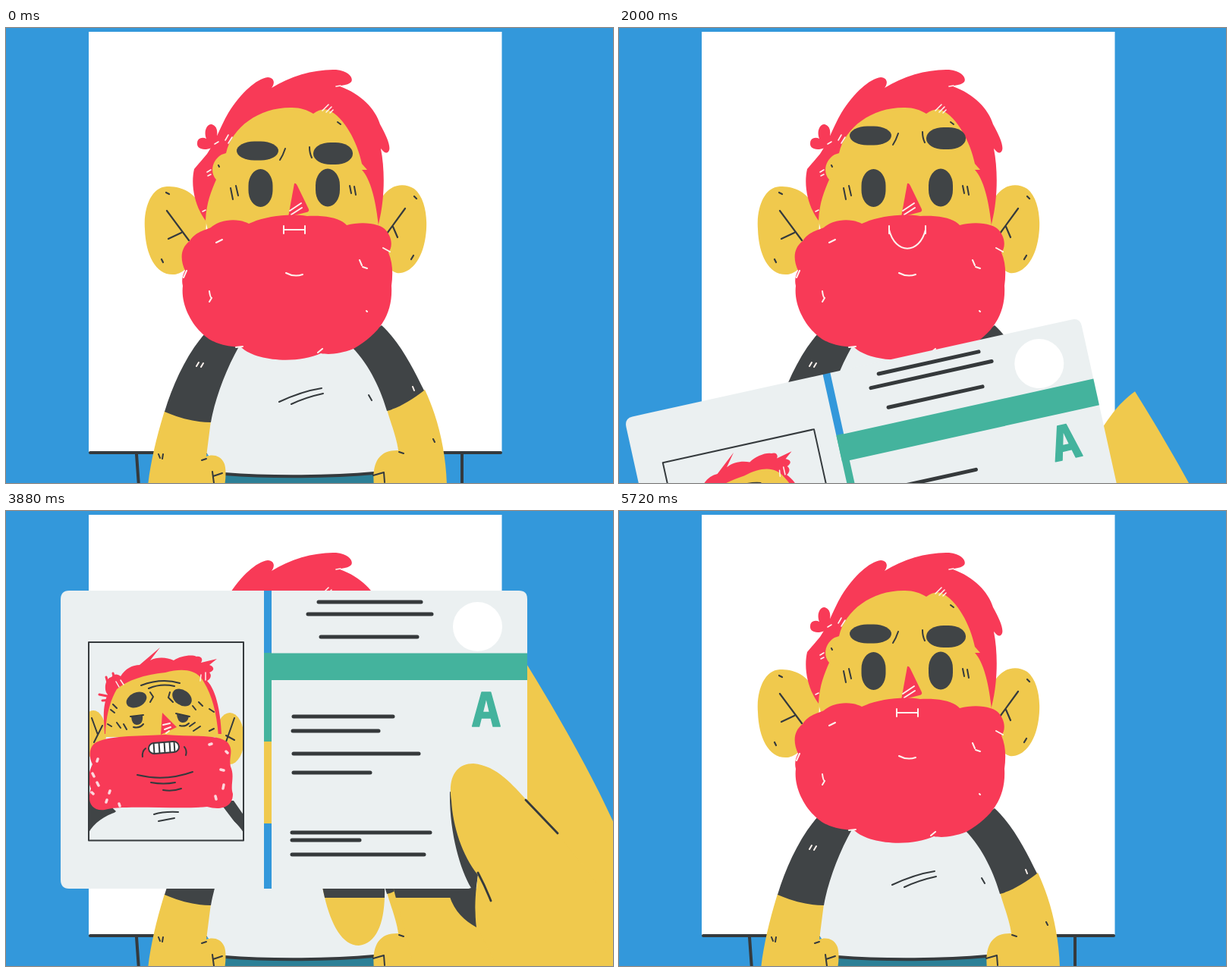
These frames come from a looping animation (800 px wide and 600 px high, 5.76 s). An HTML page:

```html
<!DOCTYPE html>
<html lang="en">
<head>
<meta charset="utf-8">
<title>Passport check</title>
<style>
html, body { margin: 0; width: 100%; height: 100%; overflow: hidden; background: #3398db; }
svg { display: block; width: 100vw; height: 100vh; }
.red { fill: #f83a57; }
.skin { fill: #f0c94d; }
.dark { fill: #404446; }
.pale { fill: #ebf0f1; }
.green { fill: #44b39d; }
.blue { fill: #3398db; }
.white { fill: #fff; }
.ink, .chalk, .rule { fill: none; stroke-linecap: round; stroke-linejoin: round; }
.ink { stroke: #353a3d; stroke-width: 2; }
.chalk { stroke: #fdf3ee; stroke-width: 2; }
.rule { stroke: #35393b; stroke-width: 5; }
text { font: 700 63px "Noto Sans Mono", monospace; text-anchor: middle; stroke: #44b39d; stroke-width: 1.5; stroke-linejoin: round; }
</style>
</head>
<body>
<svg viewBox="0 0 800 600">
  <defs>
    <clipPath id="backHand">
      <path d="M416 470V498C424 545 440 581 465 581C490 578 500 548 499 505V470ZM502 470L513 515L526 562H612V470Z"/>
    </clipPath>
    <clipPath id="photoBox"><rect x="109" y="181" width="204" height="262"/></clipPath>
  </defs>

  <rect class="blue" width="800" height="600"/>
  <path class="ink" style="stroke-width:4" d="M172 562L175 604M601 562V604"/>
  <rect class="white" x="109" y="5" width="544.500" height="554"/>
  <path class="ink" style="stroke-width:4" d="M111 560H652"/>

  <g id="body">
    <path class="pale" d="M305 415C290 445 268 490 264 560L289 592H484L517 556C515 540 507 515 502 505C496 475 480 445 456 415Z"/>
    <path fill="#2c8097" d="M287 589C350 594 430 593 486 587V604H287Z"/>
    <path class="ink" style="stroke-width:4" d="M288 588C350 593 430 592 485 587"/>
    <path class="skin" d="M209 505C198 540 190 575 187 604H288C290 592 290 582 288 575C283 563 272 562 264 565L270 518Z"/>
    <path class="skin" d="M552 477C570 515 580 560 581 604H485C482 575 490 556 517 557C515 540 505 515 502 503Z"/>
    <path class="dark" d="M263 402C238 430 220 470 209 506C230 515 250 520 270 520C275 490 290 450 307 420Z"/>
    <path class="dark" d="M495 392C520 415 537 450 551 478C535 490 520 500 502 505C495 480 480 445 456 421Z"/>
    <path class="ink" d="M360 493Q390 479 416 475M376 496Q395 487 418 482M478 484L482 491M201 562L203 567M207 562L206 568M563 542L565 546M258 570L264 568M272 585L274 600M273 591L285 587M518 559L524 561M484 590L498 586L499 599"/>
    <path class="chalk" d="M251 446L254 441M257 447L260 442M536 473L538 478"/>
  </g>

  <g id="head">
    <path class="skin" d="M264 255C255 218 235 209 212 209C190 210 181 240 183 265C184 300 198 327 222 325C235 324 242 310 262 300Z"/>
    <path class="skin" d="M490 235C500 207 522 202 538 212C554 225 556 255 553 275C548 310 530 325 515 323C502 320 498 300 480 290Z"/>
    <path class="ink" style="stroke-width:2.2" d="M212 241L241 280M231 270L214 278M211 217L215 219M205 305L207 309M526 238L502 271M510 262L516 276M534 305L537 300M538 222L541 225"/>
    <path class="red" d="M263 254C249 235 243 208 248 186L265 166C276 150 282 131 293 112C310 85 330 67 345 65C355 66 354 74 350 79C375 63 408 54 435 55C454 57 459 68 454 72C449 76 442 75 440 77C468 87 487 107 493 127C503 145 508 158 504 163C500 167 497 162 494 159C500 190 499 230 490 262H270Z"/>
    <path class="red" d="M277 153C271 162 251 163 252 152C252 145 259 143 264 146C260 136 265 126 271 127C278 129 279 136 278 142L290 140L285 160Z"/>
    <path class="skin" d="M268 275L263 254C264 230 271 214 277 200C268 190 272 174 284 167L290 165C298 130 335 104 377 105C388 105 397 108 405 113C412 108 418 106 425 108C446 118 463 150 469 179L476 187L469 187C481 200 488 230 491 262L480 285Z"/>
    <path class="ink" d="M296 211L299 226M303 208L306 221M453 208L455 218M459 209L461 220M437 124L441 127M280 181L281 183"/>
    <path class="chalk" style="stroke-width:1.6" d="M417 109L425 101M422 111L429 104M427 112L431 108M289 148L293 141M293 152L298 144M265 190L270 187M266 195L270 193M275 153L280 150M435 77L441 76M259 242L263 240"/>
    <g class="dark">
      <rect id="eyeL" x="319.5" y="186" width="32" height="50" rx="16" ry="22"/>
      <rect id="eyeR" x="408" y="185.5" width="32" height="50" rx="16" ry="22"/>
    </g>
    <g id="browL">
      <rect class="dark" x="304" y="149.5" width="55" height="25" rx="23" ry="12.5"/>
      <path class="ink" d="M368 159Q365 168 361 174"/>
    </g>
    <g id="browR">
      <rect class="dark" x="405" y="151" width="52" height="29" rx="23" ry="14"/>
      <path class="ink" d="M400 157Q400 165 403 171"/>
    </g>
    <path class="red" d="M380 205Q382 204 384 208L399 239Q400 242 396 243L372 249Z"/>
    <path class="chalk" d="M374 241L389 231M376 246L390 237"/>
    <path class="red" d="M236 320C229 305 230 290 242 281C250 268 265 266 270 263C285 250 310 252 320 258C340 249 370 244 397 248C420 247 440 250 449 260C470 254 495 258 501 267C510 278 509 290 504 296C510 310 510 325 508 340C510 375 495 402 458 423C440 430 425 431 415 429C385 443 330 440 310 421C285 420 270 413 262 406C245 392 230 365 233 340C231 332 233 325 236 320Z"/>
    <path class="chalk" d="M234 329L238 320M277 283L285 279M268 347Q269 355 271 356L268 361M369 323Q380 329 391 325M466 306L469 313M470 315L476 317M497 290L506 295M475 373L476 374M303 421L312 420M411 428L417 423"/>
    <path id="mouth" class="chalk"/>
  </g>

  <g id="hand">
    <path class="skin" d="M416 470V498C424 545 440 581 465 581C490 578 500 548 499 505V470Z"/>
    <path class="skin" d="M502 470L570 440C590 330 630 235 680 200C720 264 770 350 804 426V1200H536V604L526 562L513 515Z"/>
    <rect class="dark" x="410" y="400" width="202" height="118" clip-path="url(#backHand)"/>

    <g id="pass">
      <rect class="blue" x="339" y="113" width="12" height="393"/>
      <rect class="green" x="339" y="195" width="12" height="117"/>
      <rect class="skin" x="339" y="312" width="12" height="108"/>
      <path class="pale" d="M83 113H340V506H83Q72 506 72 494V125Q72 113 83 113Z"/>
      <path class="pale" d="M350 113H676Q687 113 687 124V495Q687 506 676 506H350Z"/>
      <rect class="green" x="340" y="195.500" width="347" height="35.500"/>
      <circle class="white" cx="621.500" cy="160.500" r="32.500"/>
      <text class="green" x="633" y="291.500">A</text>
      <path id="rules" class="rule"/>

      <g clip-path="url(#photoBox)">
        <path class="dark" d="M105 385H125L145 404L109 440ZM280 390H300L318 416V440Z"/>
        <path class="pale" d="M109 443V432C125 404 165 396 215 397C260 396 295 403 313 432V443Z"/>
        <ellipse class="skin" cx="115" cy="302" rx="17" ry="31"/>
        <ellipse class="skin" cx="295" cy="308" rx="19" ry="34"/>
        <path class="red" d="M129 285C128 268 131 256 134 250C128 244 131 228 139 227C142 222 148 223 151 226C157 216 167 211 176 211L203 188L190 205C200 200 212 201 221 205C230 199 245 197 251 200C258 199 260 204 257 208L278 203L268 211C276 214 274 219 268 221C272 225 269 230 265 232C275 242 282 265 284 302H130Z"/>
        <path fill="none" stroke="#f83a57" stroke-width="3" stroke-linecap="round" d="M138 248L132 227M146 240L141 222M138 253L123 250M139 257L127 258"/>
        <path class="skin" d="M131 306C131 285 135 262 146 243C160 231 182 224 210 221C235 214 253 218 261 234C272 252 278 276 280 306Z"/>
        <path class="ink" d="M178 238Q205 228 229 235M188 242Q204 235 222 239M190 247L194 253L190 260M216 247L214 254L220 260M113 281L121 303M127 291L116 313M301 281L288 318M290 304L301 310M141 263L146 268M138 270L143 274M246 265L250 270M254 260L259 265M268 269L274 273M134 289L139 292M146 287L151 294M155 289L159 296M242 292L249 287M247 298L256 292M268 298L274 295M168 293Q176 295 181 289M229 291Q236 293 241 288"/>
        <path class="chalk" style="stroke-width:1.500" d="M145 233L149 240M151 231L155 237M257 224L256 232M263 221L263 231"/>
        <ellipse class="dark" cx="172" cy="257" rx="14" ry="9.500" transform="rotate(-24 172 257)"/>
        <ellipse class="dark" cx="232" cy="254" rx="14" ry="10" transform="rotate(36 232 254)"/>
        <path class="dark" d="M165 279L180 278Q181 290 172 290Q166 290 165 279ZM225 276L241 279Q239 288 232 287Q226 286 225 276Z"/>
        <path class="ink" d="M164 279L181 277M224 275L242 279"/>
        <path class="red" d="M206 274L225 293L204 303Z"/>
        <path class="chalk" d="M207 290L216 288M209 296L217 293M211 301L215 298"/>
        <path class="red" d="M119 313C140 303 180 305 210 303C245 306 280 302 292 313C301 324 293 332 296 345C302 358 295 370 299 381C299 399 283 403 265 398C230 402 150 395 130 402C110 404 107 388 112 374C106 362 110 350 114 342C108 331 110 318 119 313Z"/>
        <path fill="none" stroke="#fff" stroke-width="3.500" stroke-linecap="round" opacity=".8" d="M114 354L116 358M120 366L122 370M113 379L115 381M121 335L120 338M137 377L136 380M133 389L132 392M149 394L150 397M283 349L287 350M287 369L286 374M276 384L277 388M268 316L271 315M290 325L292 327"/>
        <g transform="rotate(-4 208 320)">
          <rect class="ink" style="fill:#fff" x="188" y="313" width="40" height="14" rx="7"/>
          <path class="ink" d="M195 314V326M202 314V326M209 314V326M216 314V326M222 314V326"/>
        </g>
        <path class="ink" d="M184 321Q179 325 180 332M235 319Q239 324 237 330M173 356Q210 365 246 352M191 366Q208 369 223 366M207 376Q220 378 231 374M195 408Q208 404 227 405M201 417L222 413"/>
      </g>
      <rect class="ink" x="109" y="181" width="204" height="261.500"/>
    </g>

    <path class="dark" d="M585 378C584 430 598 480 613 505L584 514C590 535 604 548 620 557Q616 525 622 488L600 385Z"/>
    <path class="skin" d="M587 390C582 358 594 341 616 341C648 344 668 370 687 390L727 433L780 500V604H645L620 556Q617 525 622 488C601 462 589 424 587 390Z"/>
    <path class="ink" style="stroke-width:2.800" d="M685 389L727 433M622 485Q632 504 639 522"/>
  </g>

  <rect id="flash" width="800" height="600" fill="#fefefe"/>
</svg>
<script>
const LOOP = 5760, STEP = 40;
const $ = id => document.getElementById(id);
const set = (id, name, value) => $(id).setAttribute(name, value);
const move = (id, value) => set(id, "transform", value);
const mix = (a, b, p) => a + (b - a) * p;
const span = (t, a, b) => Math.min(1, Math.max(0, (t - a) / (b - a)));
const easeIn = p => p * p;
const easeOut = p => 1 - (1 - p) * (1 - p);
const easeBoth = p => p * p * (3 - 2 * p);

// start, end, y of the printed lines
const lines = [
  [412, 547, 128], [398, 561, 144], [415, 542, 174],
  [379, 510, 279], [378, 491, 298], [379, 544, 328], [379, 480, 353],
  [377, 559, 432], [377, 466, 442], [377, 551, 461]
];
set("rules", "d", lines.map(([a, b, y]) => `M${a} ${y}H${b}`).join(""));

// height offset and passport angle, or null when out of view
function handPose(t) {
  if (t < 1960 || t >= 4280) return null;
  if (t < 2200) {
    const p = easeOut(span(t, 1920, 2200));
    return [mix(560, -13, p), mix(-30, 5.8, p)];
  }
  if (t < 3880) {
    const p = easeBoth(span(t, 2200, 2480));
    return [mix(-13, 0, p), mix(5.8, 0, p)];
  }
  if (t < 3920) return [-8, 0];
  return [mix(-10.7, 520, easeIn(span(t, 3920, 4280))), 0];
}

function blink(t) {
  if (t < 440 || t >= 680) return 1;
  return t >= 480 && t < 640 ? 0.1 : 0.5;
}

function brow(id, x, y, dx, dy, turn) {
  move(id, `translate(${dx} ${dy}) rotate(${turn} ${x} ${y})`);
}

function draw(time) {
  const t = Math.floor((time % LOOP) / STEP) * STEP;

  const tilt = t < 5000 ? easeBoth(span(t, 3920, 4280)) : 1 - easeBoth(span(t, 5480, 5720));
  const smile = t < 2400 ? easeOut(span(t, 880, 1080)) : 0;
  move("head", `rotate(${5.8 * tilt} 367 350)`);
  brow("browL", 331, 162, -3 * tilt, -12 * tilt - 20 * smile, -28 * tilt);
  brow("browR", 431, 165, 0, 12 * tilt - 20 * smile, 6 * tilt);

  const s = blink(t);
  for (const id of ["eyeL", "eyeR"])
    move(id, `translate(0 ${211 * (1 - s)}) scale(1 ${s})`);

  const a = 366 - 10 * smile, b = 394 + 10 * smile, low = 266 + 33 * smile;
  set("mouth", "d", `M${a} 261V271M${a} 266C${a + 8} ${low} ${b - 8} ${low} ${b} 266M${b} 261V271`);

  const pose = handPose(t);
  set("hand", "visibility", pose ? "visible" : "hidden");
  if (pose) {
    move("hand", `translate(0 ${pose[0]})`);
    move("pass", `rotate(${pose[1]} 600 472)`);
  }
  set("flash", "visibility", t === 1440 ? "visible" : "hidden");
}

const start = performance.now();
function tick() {
  draw(performance.now() - start);
  requestAnimationFrame(tick);
}
tick();
</script>
</body>
</html>
```
